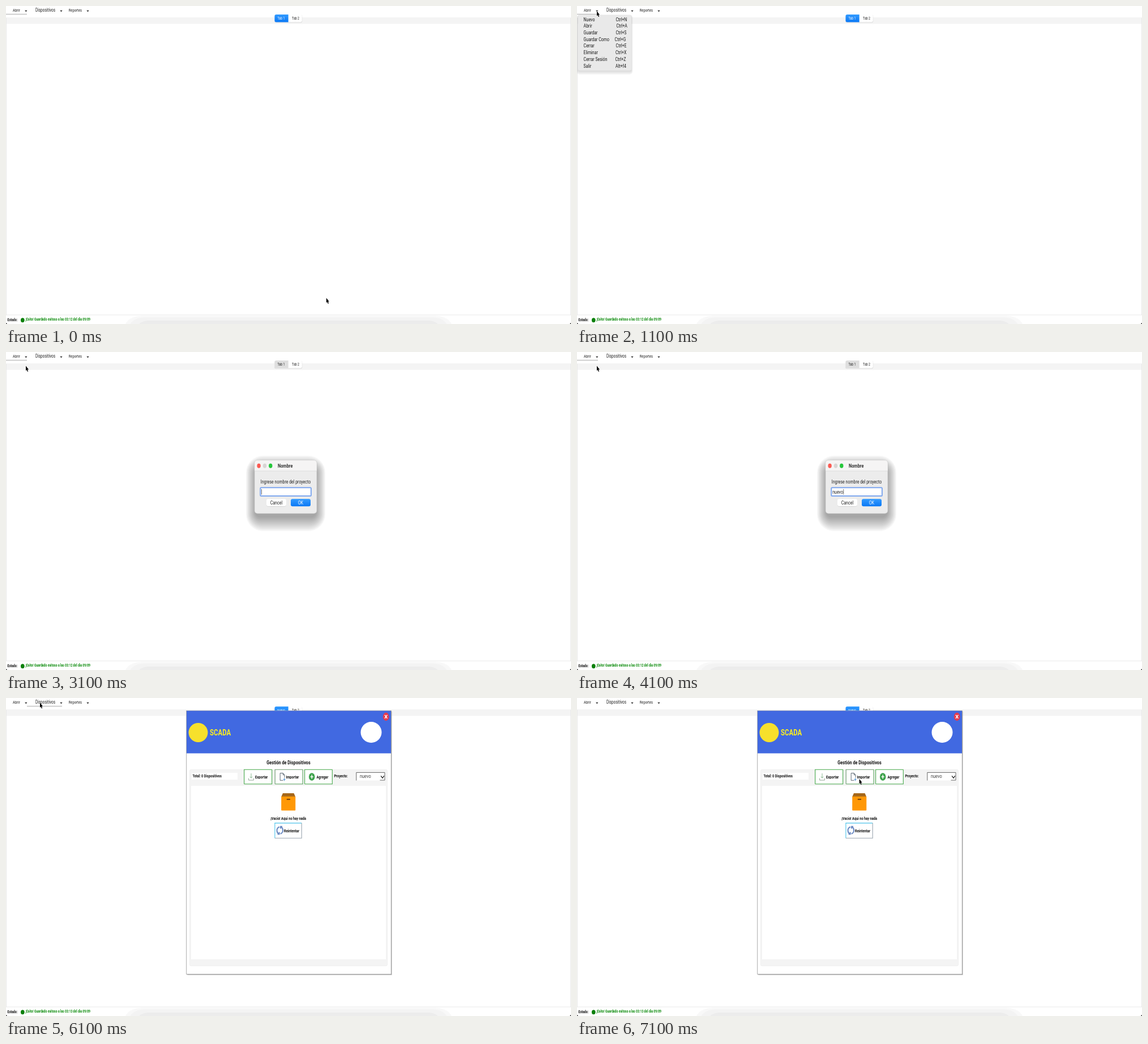
Recreate the animation shown at these times as an HTML page. Size 998 by 561 pixels, loop 8000 ms.

```html
<!DOCTYPE html>
<html lang="es">
<head>
<meta charset="utf-8">
<title>Gestión de Dispositivos</title>
<style>
html, body { margin: 0; width: 100%; height: 100%; overflow: hidden; background: #fff; }
svg { display: block; width: 998px; height: 561px; font-family: Roboto, "Noto Sans", sans-serif; }
text { white-space: pre; }
</style>
</head>
<body>
<svg id="stage" viewBox="0 0 998 561" xmlns="http://www.w3.org/2000/svg"></svg>
<script>
const SQUASH = 0.75;
const LOOP = 8000;

const rect = (x, y, w, h, fill, more = '') =>
  `<rect x="${x}" y="${y}" width="${w}" height="${h}" fill="${fill}" ${more}/>`;
const path = (d, stroke, width = 1, more = 'fill="none"') =>
  `<path d="${d}" stroke="${stroke}" stroke-width="${width}" ${more}/>`;
const oval = (x, y, rx, ry, fill) =>
  `<ellipse cx="${x}" cy="${y}" rx="${rx}" ry="${ry}" fill="${fill}"/>`;
const text = (x, y, str, size, fill = '#222', more = '') =>
  `<text transform="translate(${x} ${y}) scale(${SQUASH} 1)" font-size="${size}" fill="${fill}" ${more}>${str}</text>`;
const bold = (x, y, str, size, fill = '#111', more = '') =>
  text(x, y, str, size, fill, `font-weight="700" ${more}`);
const group = (id, body, more = '') => `<g id="${id}" ${more}>${body}</g>`;
const MID = 'text-anchor="middle"';

// Soft shadow: rounded boxes stacked from an outer to an inner box
function shadow(outer, inner, r, layers, alpha) {
  let out = '';
  for (let i = 0; i < layers; i++) {
    const k = i / (layers - 1);
    const [x, y, w, h] = outer.map((v, j) => v + (inner[j] - v) * k);
    out += rect(x, y, w, h, '#000', `rx="${r * (1 - 0.7 * k)}" opacity="${alpha}"`);
  }
  return out;
}

const chevron = x => path(`M${x - 1.5} 7.7L${x} 9.4L${x + 1.5} 7.7`, '#222', 1.1);
const hover = (x, w) =>
  rect(x, 13.4, w, 2.2, '#000', 'opacity=".07"') + rect(x, 14, w, 0.9, '#b4b4b4');

function desktop() {
  return rect(0, 0, 998, 561, '#fff') +
    rect(0.5, 21, 997, 524, '#fff', 'stroke="#e9e9e9" stroke-width="1"') +
    rect(1, 21, 996, 10.5, '#f4f4f4') +
    rect(210, 546.5, 578, 40, '#f8f8f8', 'rx="30"') +
    rect(217, 549.5, 564, 40, '#f3f3f3', 'rx="26"') +
    rect(229, 555, 540, 40, '#ececec', 'rx="22"') +
    path('M0 558.5V561H2.5Q.6 560.6 0 558.5ZM998 558.5V561H995.5Q997.4 560.6 998 558.5Z', 'none', 0, 'fill="#000"') +
    text(12, 10.3, 'Abrir', 8) + text(52, 10.3, 'Dispositivos', 8.6) + text(110.8, 10.3, 'Reportes', 7.7) +
    [35.3, 97.5, 144.5].map(chevron).join('') +
    bold(2.6, 556.3, 'Estado:', 7) +
    oval(29.3, 554.3, 3.3, 4, '#0a800a') +
    bold(34.3, 554.9, '', 6.9, '#0a8a0a', 'id="status"');
}

function tabs() {
  return rect(474, 15.6, 49.3, 13.8, '#000', 'rx="3" opacity=".1"') +
    rect(474.5, 15, 48.3, 13.4, '#fff', 'rx="3"') +
    '<path id="tab" d="M477.5 15H498.7V28.4H477.5Q474.5 28.4 474.5 25.4V18Q474.5 15 477.5 15Z"/>' +
    text(485.9, 24.3, '', 7, '#fff', MID + ' id="tabName"') +
    text(511.5, 24.3, 'Tab 2', 7, '#222', MID);
}

function menu() {
  const items = [
    ['Nuevo', 68.4, 'Ctrl+N'], ['Abrir', 69.4, 'Ctrl+A'], ['Guardar', 68.4, 'Ctrl+S'],
    ['Guardar Como', 66.6, 'Ctrl+G'], ['Cerrar', 68.6, 'Ctrl+E'], ['Eliminar', 68, 'Ctrl+X'],
    ['Cerrar Sesión', 67.4, 'Ctrl+Z'], ['Salir', 68, 'Alt+f4']
  ];
  return shadow([-1, 15, 99.5, 106], [2, 17, 94, 98], 6, 4, 0.04) +
    rect(2, 16.5, 94, 97.5, '#e9e9e9', 'rx="3"') +
    rect(2, 17.8, 94, 11.4, '#6c9af0', 'id="pick"') +
    items.map(([name, x, key], i) => {
      const y = 26.6 + i * 11.72;
      return text(11.6, y, name, 9.35, '#161616') + text(x, y, key, 9.35, '#161616');
    }).join('');
}

function prompt() {
  return shadow([424, 183, 140, 133], [440, 205, 108, 87], 30, 12, 0.034) +
    rect(439, 191, 110, 94, '#ececec', 'rx="5" stroke="#bdbdbd" stroke-width=".6"') +
    path('M439.3 209.8V196Q439.3 191.3 444 191.3H544Q548.7 191.3 548.7 196V209.8Z', 'none', 0, 'fill="#f5f4f4"') +
    rect(439.3, 209.6, 109.4, 0.7, '#d4d4d4') +
    oval(446.6, 200.7, 3.2, 4, '#fb5a52') + oval(457, 200.7, 3.2, 4, '#d8d5d4') + oval(467.3, 200.7, 3.2, 4, '#25c73b') +
    bold(480, 203.8, 'Nombre', 9.8, '#333') +
    text(494, 231.7, 'Ingrese nombre del proyecto', 9.3, '#222', MID) +
    rect(449.3, 239.3, 89.6, 14.6, '#fff', 'rx="1.5" stroke="#80a8ee" stroke-width="2"') +
    text(451.2, 249.8, '', 9.3, '#222', 'id="typed"') +
    rect(0, 242, 0.8, 9.5, '#555', 'id="caret"') +
    rect(460, 260, 35, 12.8, '#000', 'rx="3" opacity=".12"') + rect(460, 259.3, 35, 12.8, '#fff', 'rx="3"') +
    text(477.4, 268.9, 'Cancel', 9.4, '#222', MID) +
    rect(503, 259.3, 35, 13, 'url(#blue)', 'rx="3"') +
    text(520.4, 268.9, 'OK', 9.5, '#fff', MID);
}

const button = (x, y, w, h, color, edge = color) =>
  rect(x, y, w, h, '#fff') +
  path(`M${x} ${y + h}V${y}H${x + w}`, color, 1.1) +
  path(`M${x + w} ${y}V${y + h}H${x}`, edge, 1.1);

function devices() {
  const spin = 'M482.8 227.2Q478 229.5 478.6 234.5Q479 238.5 482.3 239.8M482.8 236.6L482.6 240.2L479.6 240.2';
  const green = '#45a84a';
  return rect(320.5, 24, 361.5, 465, '#000', 'opacity=".12"') +
    rect(319.5, 23, 361.7, 465.3, '#000', 'opacity=".3"') +
    rect(318.7, 22.4, 361.6, 464.8, '#fff', 'stroke="#9a9a9a" stroke-width=".8"') +
    rect(319, 22.6, 361, 75, '#4169e1') +
    '<circle cx="339.5" cy="61" r="17" fill="#f7e02c"/>' +
    '<circle cx="645" cy="60.5" r="18.5" fill="#fff"/>' +
    bold(360, 66, 'SCADA', 15.2, '#fdf01c') +
    oval(671.2, 33, 5.5, 7.2, '#e33b4e') + path('M669 30L673.4 36M673.4 30L669 36', '#fff', 1.3) +
    bold(499, 117, 'Gestión de Dispositivos', 9.75, '#111', MID) +
    rect(324.5, 126.5, 349, 346, '#f4f4f4', 'rx="2" stroke="#ebebeb" stroke-width=".7"') +
    rect(327, 155, 344, 306, '#fff') + rect(328, 132, 81, 12, '#fff') +
    bold(329.5, 140.3, 'Total: 0 Dispositivos', 7.55) +
    button(420.7, 126.3, 49, 25.4, green) +
    button(475.2, 126.3, 49, 25.4, '#6d9a70', '#5aa35e') +
    button(527.6, 126.3, 48.7, 25.4, green) +
    // download tray
    path('M428.6 141.5V145H437.4V141.5', '#8aa08c', 0.9) +
    path('M433 133V141M430.8 138.7L433 141.3L435.2 138.7', '#7fb58a', 0.9) +
    bold(440, 141.9, 'Exportar', 7.85) +
    // sheet
    path('M489.6 145.3H484.2V132.5H489.3L492 135.7V140.5M489.3 132.5V135.7H492', '#4b5866', 0.9) +
    path('M491.6 141.2V146.2M489.7 143.7H493.5', '#5b9bd8', 1.2) +
    bold(494.5, 141.9, 'Importar', 7.85) +
    oval(540.2, 139, 5.3, 6.8, '#3fa34d') + path('M540.2 135.6V142.4M537.6 139H542.8', '#fff', 1.4) +
    bold(548.4, 141.9, 'Agregar', 7.7) +
    bold(579.4, 140.3, 'Proyecto:', 7.55) +
    rect(618.6, 131.3, 50.6, 14.2, '#fff') +
    path('M618.8 145.5V131.4H669V145H660.5', '#555', 0.9) +
    path('M662.2 137.3L665 141.3L667.8 137.3', '#111', 1.2) +
    text(625, 141.2, 'nuevo', 9.8, '#444') +
    // empty box
    path('M489 168H508.5L511.3 174.5H486.2Z', 'none', 0, 'fill="#a5671a"') +
    rect(486.2, 173.8, 25.1, 24.7, '#ff9806', 'rx="1"') + rect(495.7, 177.8, 6.4, 2, '#6d4010', 'rx=".8"') +
    bold(498.6, 215.2, '¡Vacio! Aqui no hay nada', 7.6, '#111', MID) +
    button(474.9, 220.6, 47.3, 26.6, '#4cc3ea', '#9aa5b0') +
    path(spin, '#6f8dc4', 2.1) +
    `<g transform="rotate(180 483.8 233.5)">${path(spin, '#6f8dc4', 2.1)}</g>` +
    bold(491, 236.6, 'Reintentar', 7.7);
}

const stage = document.getElementById('stage');
stage.innerHTML =
  '<defs><linearGradient id="blue" x1="0" y1="0" x2="0" y2="1">' +
  '<stop offset="0" stop-color="#339bff"/><stop offset="1" stop-color="#0a78f5"/></linearGradient></defs>' +
  desktop() + group('hoverOpen', hover(0, 37)) + group('hoverDevices', hover(37, 62)) + tabs() +
  group('menu', menu()) + group('prompt', prompt()) + group('devices', devices()) +
  group('cursor', path('M0 0V8.6L1.6 7L2.9 10.3L4.2 9.6L3 6.5H5.1Z', '#fff', 0.7, 'fill="#000" paint-order="stroke"'));

const $ = id => document.getElementById(id);
const show = (id, on) => $(id).setAttribute('visibility', on ? 'visible' : 'hidden');

// Pointer tip in each step; null while it is hidden
const pointer = [[565.8, 515], [80, 15], [35, 9], [35, 24.4], [35, 24.4], [35, 24.4], null, [60, 8.3], [498.6, 142.7]];

function draw(ms) {
  const step = ms < 100 ? 0 : 1 + Math.floor((ms - 100) / 1000);
  const leaving = step === 3; // menu fades while the prompt pops up
  const asking = step >= 3 && step <= 5;
  const created = step >= 6;

  show('hoverOpen', step < 6);
  show('hoverDevices', step === 7);
  show('menu', step === 2 || leaving);
  show('pick', leaving);
  $('menu').setAttribute('opacity', leaving ? 0.52 : 1);

  show('prompt', asking);
  $('prompt').setAttribute('opacity', leaving ? 0.5 : 1);
  $('prompt').setAttribute('transform',
    leaving ? 'translate(494.5 238.3) scale(.373) translate(-494 -238)' : '');
  $('typed').textContent = step === 5 ? 'nuevo' : '';
  $('caret').setAttribute('x', step === 5 ? 470.4 : 451);
  if (!asking) show('caret', false); else $('caret').removeAttribute('visibility');
  if (step === 2) show('pick', false); else $('pick').removeAttribute('visibility');

  show('devices', step >= 7);
  $('tab').setAttribute('fill', asking ? '#dedede' : 'url(#blue)');
  $('tabName').setAttribute('fill', asking ? '#222' : '#fff');
  $('tabName').textContent = created ? 'nuevo' : 'Tab 1';
  $('status').textContent = `¡Exito! Guardado exitoso a las 03:1${created ? 3 : 2} del dia 09/09`;

  const tip = pointer[step];
  show('cursor', tip);
  if (tip) $('cursor').setAttribute('transform', `translate(${tip})`);
}

const start = performance.now();
function tick() {
  draw((performance.now() - start) % LOOP);
  requestAnimationFrame(tick);
}
draw(0);
requestAnimationFrame(tick);
</script>
</body>
</html>
```
